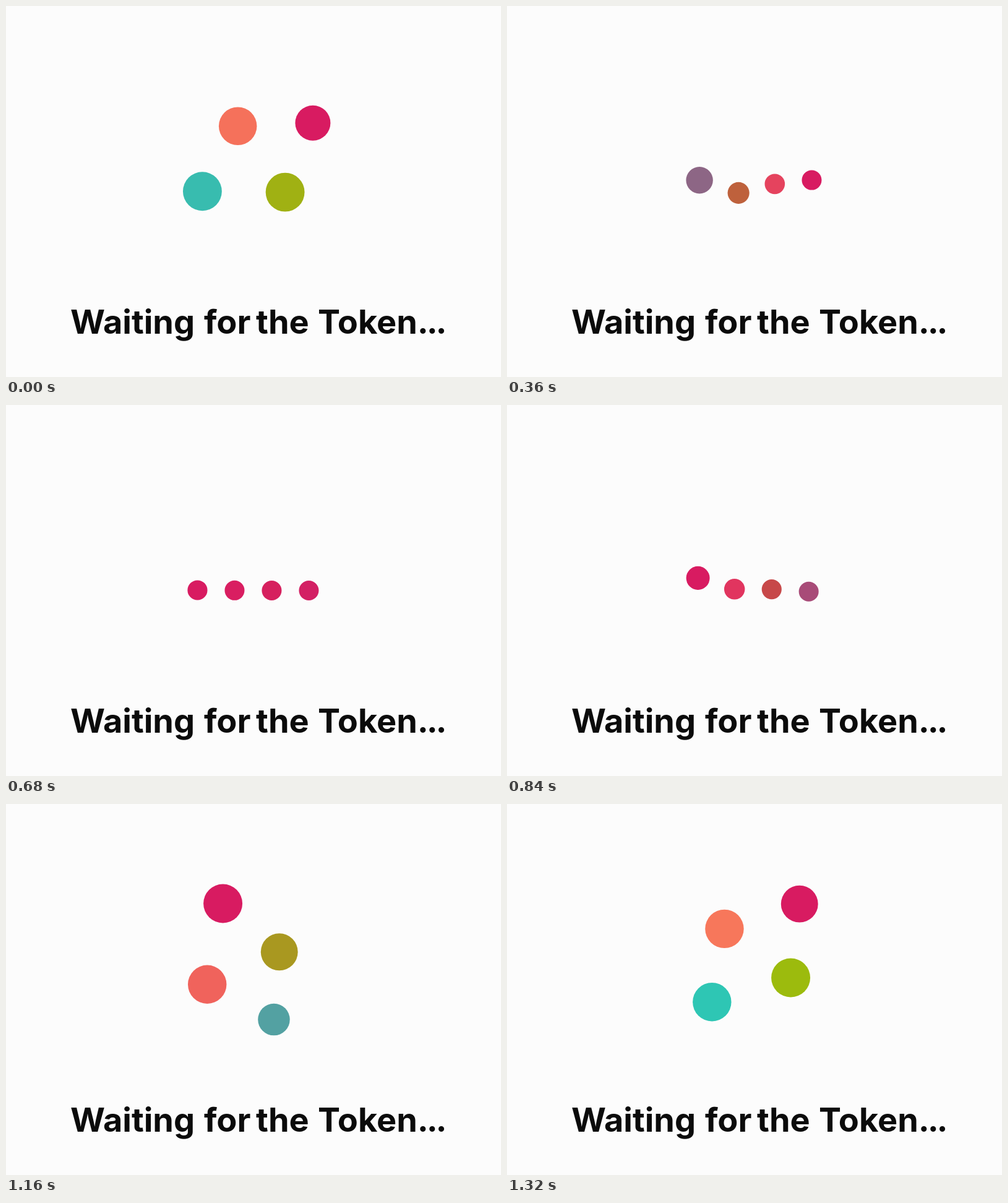
These frames come from a looping animation (800x600 px, 1.36 s). An HTML page:

```html
<!DOCTYPE html>
<html lang="en">
<head>
<meta charset="utf-8">
<title>Waiting for the Token</title>
<style>
  html, body { margin: 0; width: 100%; height: 100%; overflow: hidden; background: #fcfcfc; }
  svg { display: block; width: 800px; height: 600px; }
  text { font: 700 54px Inter, "Open Sans", sans-serif; fill: #0b0b0b; }
  .tail { letter-spacing: -0.06em; }
</style>
</head>
<body>
<svg viewBox="0 0 800 600">
  <g id="dots"></g>
  <text y="530"><tspan x="104">Waiting </tspan><tspan x="320">for </tspan><tspan x="404">the </tspan><tspan x="504">Token</tspan><tspan class="tail">...</tspan></text>
</svg>
<script>
const STEP = 40, LOOP = 1360, CYCLE = 33, START = 15;
const PINK = [216, 27, 97];
const COLORS = [PINK, [247, 120, 91], [155, 190, 12], [43, 201, 181]];

const group = document.getElementById('dots');
const dots = COLORS.map((color, i) => {
  const el = document.createElementNS('http://www.w3.org/2000/svg', 'circle');
  group.append(el);
  return { el, color, x: -90 + 60 * i, side: i % 2 ? 1 : -1, delay: 2 * i };
});

const clamp = v => Math.min(1, Math.max(0, v));
const mix = (a, b, k) => a + (b - a) * k;

// Symmetric cubic-bezier(.72, 0, .28, 1)
function ease(x) {
  const bez = (t, a, b) => 3 * (1 - t) * (1 - t) * t * a + 3 * (1 - t) * t * t * b + t * t * t;
  let lo = 0, hi = 1;
  for (let i = 0; i < 24; i++) {
    const mid = (lo + hi) / 2;
    if (bez(mid, 0.72, 0.28) < x) lo = mid; else hi = mid;
  }
  return bez(lo, 0, 1);
}

function draw(ms) {
  // The first pose is held for two steps
  const step = Math.max(0, Math.floor((ms % LOOP) / STEP) - 1);
  const n = step < START ? step + CYCLE : step;

  const turn = Math.PI * ease(clamp((n - START) / CYCLE));
  const cos = Math.cos(turn), sin = Math.sin(turn);
  const cx = 399.5 - 15 * Math.sin(2 * turn);
  const cy = 300 - 59.5 * sin;
  const tint = clamp(1 - Math.abs(n - 31.75) / 16.25);

  for (const { el, color, x, side, delay } of dots) {
    const grow = ease(clamp(1 - Math.abs(n - delay - 28) / 13));
    const y = side * 60 * grow;
    el.setAttribute('cx', cx + x * cos - y * sin);
    el.setAttribute('cy', cy + x * sin + y * cos);
    el.setAttribute('r', mix(16, 31.5, grow));
    el.setAttribute('fill', `rgb(${PINK.map((c, k) => Math.round(mix(c, color[k], tint)))})`);
  }
}

const t0 = performance.now();
function tick() {
  draw(performance.now() - t0);
  requestAnimationFrame(tick);
}
tick();
</script>
</body>
</html>
```
